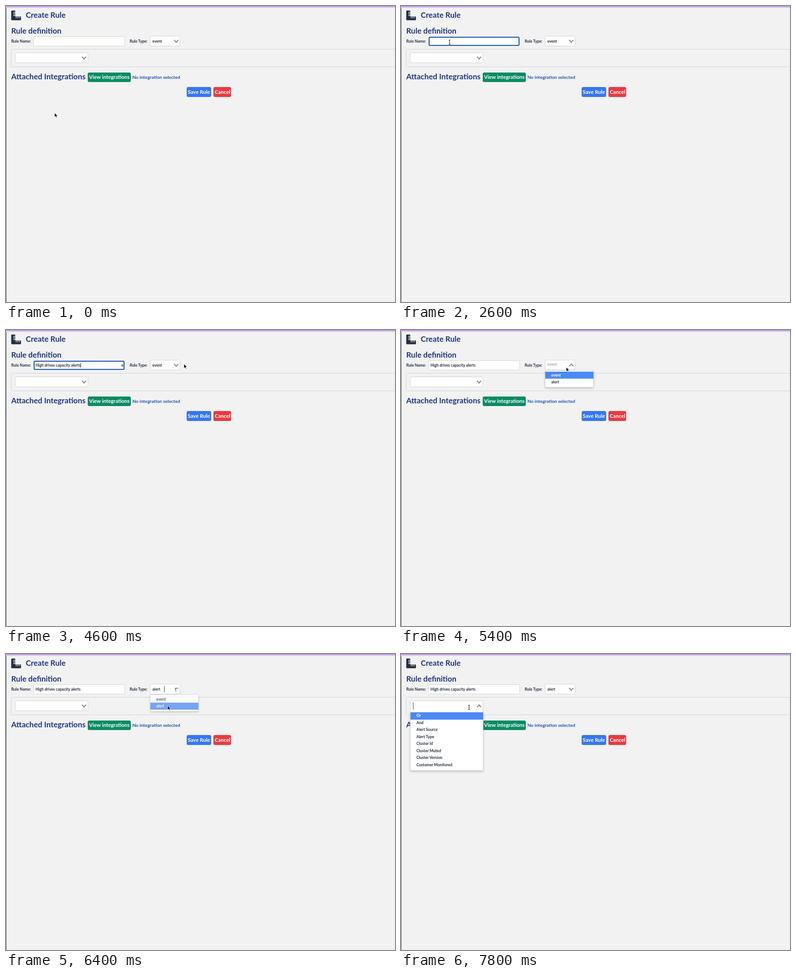
Animation of 857 by 654 pixels, one loop 8000 ms. Source, as an HTML page:

```html
<!DOCTYPE html>
<html lang="en">
<head>
<meta charset="utf-8">
<title>Create Rule</title>
<style>
  html, body { margin: 0; width: 100%; height: 100%; overflow: hidden; background: #f2f2f2; }
  svg { display: block; }
  text { font: 700 8.5px Lato, "Open Sans", sans-serif; fill: #252f3f; white-space: pre; }
  .title { font-size: 17px; fill: #22347d; }
  .button { font-size: 11.4px; fill: #fff; }
  .note { font-size: 10.1px; fill: #2350b0; }
  .field { fill: #fefefc; stroke: #d3d4d6; }
  .chevron { fill: none; stroke: #8b8c8e; stroke-width: 2.2; }
  .list { fill: #fff; stroke: #d3d4d6; filter: drop-shadow(0 2px 2px #0003); }
  .active { fill: #4b89f5; }
  .caret { fill: #333; }
</style>
</head>
<body>
<svg width="857" height="654" viewBox="0 0 857 654">
  <defs>
    <linearGradient id="glow" x2="0" y2="1">
      <stop stop-color="#b284e2"/>
      <stop offset=".4" stop-color="#cfb5ea"/>
      <stop offset="1" stop-color="#f2f2f2"/>
    </linearGradient>
  </defs>
  <rect width="857" height="654" fill="#f2f2f2"/>
  <rect y="2" width="1" height="652" fill="#4c5161"/>
  <rect width="857" height="5" fill="url(#glow)"/>

  <path fill="#252f3f" d="M13 10h6q1.500 0 1.500 1.500V23H31.500q1.500 0 1.500 1.500V30q0 1.500-1.500 1.500H13q-1.500 0-1.500-1.500V11.500q0-1.500 1.500-1.500z"/>
  <path stroke="#f2f2f2" stroke-width="1.300" d="M16 14h5M16 17.500h5M16 21h5M22.500 22.500v4.500M26 22.500v4.500M29.500 22.500v4.500"/>
  <text class="title" x="43.500" y="26">Create Rule</text>
  <text class="title" x="11.500" y="61">Rule definition</text>
  <text x="11.500" y="80.500">Rule Name:</text>
  <text x="272.500" y="80.500">Rule Type:</text>

  <rect class="field" x="60.500" y="67.500" width="201" height="21" rx="3"/>
  <g id="focus">
    <rect x="60" y="67" width="202" height="22" rx="4" fill="#dfe8f5"/>
    <rect x="62" y="69" width="198" height="18" rx="2" fill="#fefefc" stroke="#1b4fa6" stroke-width="2"/>
    <path id="clear" d="M254.500 76.500l3.500 4m0-4l-3.500 4" stroke="#33507f" stroke-width="1.300"/>
    <rect id="nameCaret" class="caret" y="73" width="1" height="10"/>
  </g>
  <text id="name" x="65" y="80.500"></text>

  <rect x="11.500" y="95.500" width="860" height="39" rx="3" fill="none" stroke="#cbd2dc"/>
  <rect class="field" x="317.500" y="66.500" width="66" height="22" rx="3"/>
  <text id="type" x="322.500" y="80.500"></text>
  <rect id="typeCaret" class="caret" x="348.500" y="71" width="1" height="14"/>
  <path id="typeChevron" class="chevron" d="M-4.500-2.500L0 2.500L4.500-2.500"/>

  <rect class="field" x="20.500" y="103.500" width="160" height="22" rx="3"/>

  <text class="title" x="11.500" y="162">Attached Integrations</text>
  <rect x="180" y="147" width="95" height="21" rx="3.500" fill="#0a8b63"/>
  <text class="button" x="183" y="161">View integrations</text>
  <text class="note" x="278.500" y="161">No integration selected</text>
  <rect x="398" y="179" width="54" height="22" rx="3.500" fill="#3677f1"/>
  <text class="button" x="400.500" y="193.500">Save Rule</text>
  <rect x="457" y="179" width="39" height="22" rx="3.500" fill="#e83b3f"/>
  <text class="button" x="460" y="193.500">Cancel</text>

  <g id="typeList">
    <path class="list" d="M317.500 89.500H424V124q0 2.500-2.500 2.500H320q-2.500 0-2.500-2.500z"/>
    <rect id="typeActive" class="active" x="318" width="106" height="15.500"/>
    <text id="eventItem" x="331" y="102.500">event</text>
    <text id="alertItem" x="331" y="118">alert</text>
  </g>
  <g id="fieldList">
    <path class="list" d="M20.500 128.500H181V255q0 2.500-2.500 2.500H23q-2.500 0-2.500-2.500z"/>
    <path class="field" d="M20.500 128.500V106q0-2.500 2.500-2.500H178q2.500 0 2.500 2.500v22.500z"/>
    <rect class="active" x="21" y="129" width="160" height="16"/>
    <rect id="fieldCaret" class="caret" x="26.500" y="107" width="1" height="16"/>
  </g>
  <path id="fieldChevron" class="chevron" d="M-4.500-2.500L0 2.500L4.500-2.500"/>

  <g id="pointer">
    <path id="arrow" d="M0 0V9.500L2.200 7.500L3.800 11L5.400 10.300L3.900 7H6.800z" fill="#000" stroke="#fff" stroke-width=".8"/>
    <path id="beam" d="M-2-5Q0-5 0-3.500Q0-5 2-5M0-4V4M-2 5Q0 5 0 3.500Q0 5 2 5" fill="none" stroke="#222" stroke-width="1.100"/>
    <path id="hand" d="M-1.800-5q1-.8 1.600.4V-1.500L3.300-.8Q4.500-.3 4.300 1.200L3.500 5.500H-1L-4.200 1.500Q-4 0-2.500.8L-1.800 1.400z" fill="#fff" stroke="#111" stroke-width="1"/>
  </g>
</svg>
<script>
  const LOOP = 8000, STEP = 200;
  const NAME = "High drives capacity alerts";
  const FIELDS = ["Or", "And", "Alert Source", "Alert Type", "Cluster Id",
    "Cluster Muted", "Cluster Version", "Customer Monitored"];
  // time, x, y, shape
  const POINTER = [
    [0, 107, 236, "arrow"], [200, 107, 236, "arrow"], [1200, 106, 86, "arrow"],
    [1400, 106, 84, "arrow"], [1600, 107, 80, "beam"], [4000, 107, 80, "beam"],
    [4400, 380, 76, "arrow"], [4600, 392, 75, "arrow"], [4800, 388, 76, "arrow"],
    [5000, 366, 79, "arrow"], [5400, 364, 82, "arrow"], [5600, 364, 98, "hand"],
    [5800, 364, 105, "hand"], [6000, 357, 117, "hand"], [6400, 356, 114, "arrow"],
    [6600, 350, 114, "arrow"], [7200, 150, 118, "beam"], [8000, 150, 118, "beam"]
  ];

  const el = id => document.getElementById(id);
  const show = (id, on) => { el(id).style.display = on ? "" : "none"; };
  const set = (id, key, value) => el(id).setAttribute(key, value);
  const between = (t, from, to) => t >= from && t < to;
  const ease = p => p * p * (3 - 2 * p);
  const chevron = (id, x, y, angle) =>
    set(id, "transform", `translate(${x} ${y}) rotate(${angle})`);

  FIELDS.forEach((label, i) => {
    const item = document.createElementNS("http://www.w3.org/2000/svg", "text");
    item.setAttribute("x", 34);
    item.setAttribute("y", 139 + 15.5 * i);
    item.textContent = label;
    if (!i) item.style.fill = "#fff";
    el("fieldList").append(item);
  });

  function drawPointer(t) {
    const i = Math.max(1, POINTER.findIndex(k => k[0] > t));
    const a = POINTER[i - 1], b = POINTER[i];
    const p = ease((t - a[0]) / (b[0] - a[0]));
    set("pointer", "transform",
      `translate(${a[1] + (b[1] - a[1]) * p} ${a[2] + (b[2] - a[2]) * p})`);
    for (const shape of ["arrow", "beam", "hand"]) show(shape, shape === a[3]);
  }

  function drawName(t) {
    const typed = Math.round(NAME.length * Math.min(1, Math.max(0, (t - 2600) / 1600)));
    el("name").textContent = NAME.slice(0, typed);
    show("focus", between(t, 1800, 5200));
    show("clear", typed > 0);
    show("nameCaret", typed > 0);
    set("nameCaret", "x", 65 + (typed ? el("name").getComputedTextLength() : 0));
  }

  function drawType(t) {
    const open = between(t, 5200, 6400), closing = between(t, 6400, 6600);
    const onAlert = t >= 6000;
    el("type").textContent = t < 6400 ? "event" : "alert";
    el("type").style.fill = open ? "#a9abae" : "";
    set("type", "y", open ? 79 : 80.5);
    show("typeCaret", closing);
    chevron("typeChevron", 375, 77.5, open ? 180 : closing ? 125 : 0);
    show("typeList", open || closing);
    el("typeList").style.opacity = closing ? 0.74 : 1;
    set("typeActive", "y", onAlert ? 107.5 : 92);
    el("eventItem").style.fill = onAlert ? "" : "#fff";
    el("alertItem").style.fill = onAlert ? "#fff" : "";
  }

  function drawField(t) {
    const open = t >= 7400;
    show("fieldList", open);
    chevron("fieldChevron", 172, open ? 115 : 114.5, open ? 180 : 0);
  }

  const start = performance.now();
  function tick(now) {
    const t = Math.floor(Math.max(0, now - start) % LOOP / STEP) * STEP;
    drawPointer(t);
    drawName(t);
    drawType(t);
    drawField(t);
    requestAnimationFrame(tick);
  }
  tick(start);
</script>
</body>
</html>
```
